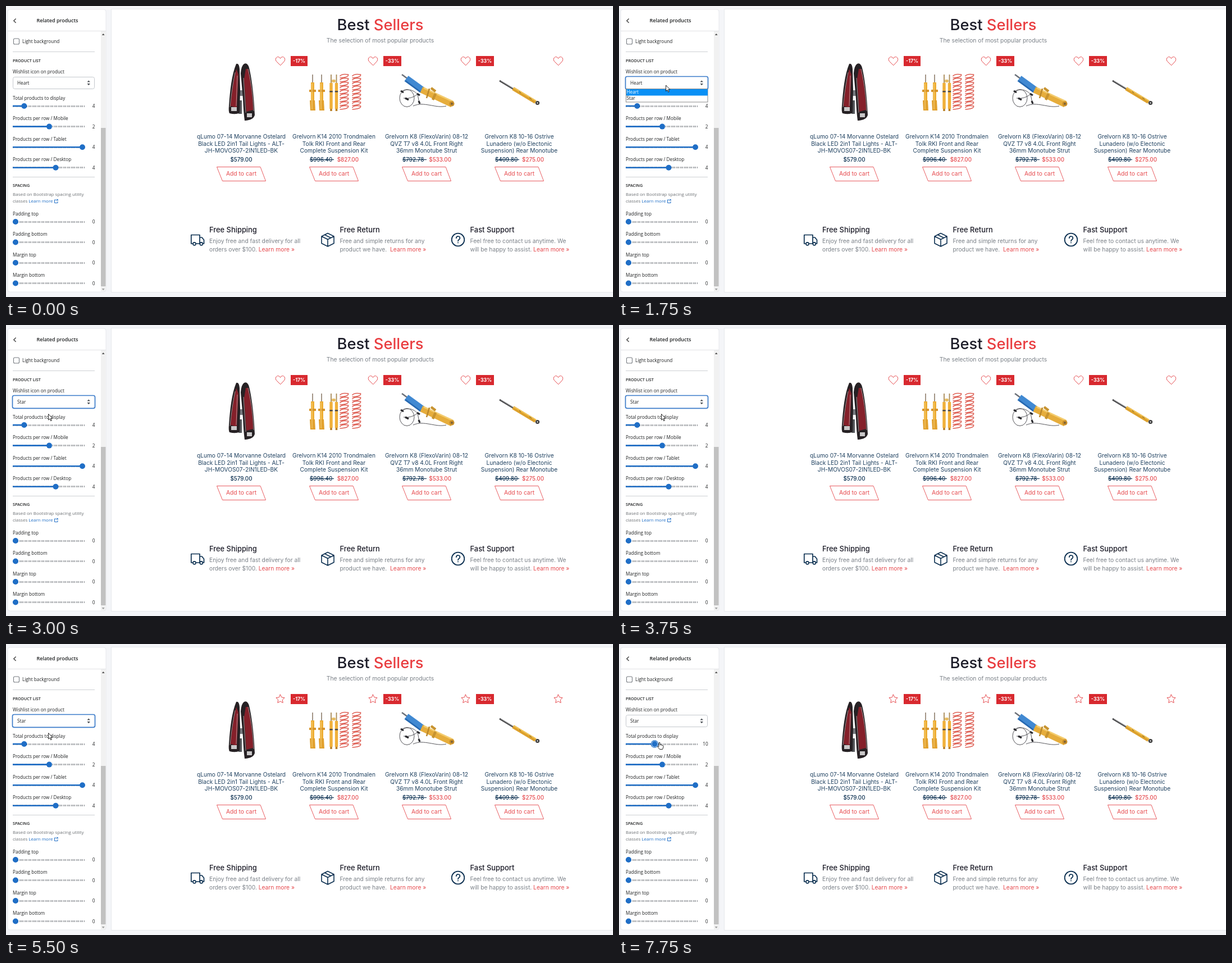
An HTML page for the animation above (8000 ms loop, 1081 by 518 pixels).

```html
<!DOCTYPE html>
<html lang="en">
<head>
<meta charset="utf-8">
<title>Related products editor</title>
<style>
html, body { margin: 0; width: 100%; height: 100%; overflow: hidden; background: #f4f5f8; }
svg { display: block; width: 100vw; height: 100vh; }
text { white-space: pre; font-optical-sizing: none; }
.ui { font-family: "Open Sans", "Noto Sans", sans-serif; }
.shop { font-family: Inter, "Open Sans", sans-serif; }
</style>
</head>
<body>
<svg id="stage" viewBox="0 0 1081 518"></svg>
<script>
const LOOP = 8000, SCROLL = 334;
const INK = '#202223', BLUE = '#1f6ec6', NAVY = '#0b2f50', TITLE = '#1f4160', RED = '#e64a4e', GREY = '#7b8188';

const text = (x, y, size, content, fill, extra = '') =>
  `<text x="${x}" y="${y}" font-size="${size}" fill="${fill}" ${extra}>${content}</text>`;
const mid = (x, y, size, content, fill, extra = '') =>
  text(x, y, size, content, fill, 'text-anchor="middle" ' + extra);
const rect = (x, y, w, h, fill, extra = '') =>
  `<rect x="${x}" y="${y}" width="${w}" height="${h}" fill="${fill}" ${extra}/>`;
const circle = (x, y, r, fill, extra = '') =>
  `<circle cx="${x}" cy="${y}" r="${r}" fill="${fill}" ${extra}/>`;
const line = (d, stroke, width = 1, extra = '') =>
  `<path d="${d}" fill="none" stroke="${stroke}" stroke-width="${width}" ${extra}/>`;
const shape = (d, fill, extra = '') => `<path d="${d}" fill="${fill}" ${extra}/>`;
const group = (content, attrs = '') => `<g ${attrs}>${content}</g>`;
const W = n => `font-weight="${n}"`;
const ROUND = 'stroke-linejoin="round" stroke-linecap="round"';

// Settings panel
function slider(label, y, thumb, value, id = '') {
  const tag = part => id ? `id="${id}-${part}"` : '';
  return text(12, y - 11.5, 8.2, label, INK) +
    line(`M12 ${y}H141`, '#85898e', 3, 'stroke-dasharray="1 1.3" shape-rendering="crispEdges"') +
    line(`M12 ${y}H${thumb}`, BLUE, 2.6, tag('fill')) +
    circle(thumb, y, 6.2, '#fff', `stroke="${BLUE}" stroke-width="1.2" ${tag('ring')} visibility="hidden"`) +
    circle(thumb, y, 5, BLUE, tag('thumb')) +
    mid(id ? 154.5 : 156, y + 3, 8.2, value, INK, tag('value'));
}

function panel() {
  const rule = y => line(`M12 ${y}H158`, '#cdd0d4');
  return rect(3, 6, 175, 503, '#fff', 'rx="4" stroke="#e6e8ec"') +
    line('M17.6 22.5L13.8 26.2L17.6 29.9', '#444', 1.4) +
    mid(91.5, 29, 9, 'Related products', INK, W(600)) +
    line('M3 44.5H178', '#e1e3e6') +
    rect(169, 45, 8.5, 463, '#f1f1f1') + rect(169, 217, 8.5, 282, '#c1c1c1') +
    shape('M170.8 52L173.2 49L175.6 52Z', '#505050') + shape('M170.8 503L173.2 506L175.6 503Z', '#9a9a9a') +
    rect(13.5, 58, 10, 10, '#fff', 'rx="2" stroke="#767b80" stroke-width="1.1"') +
    text(29, 66, 8.2, 'Light background', INK) + rule(81.5) +
    text(12, 99.5, 7.2, 'PRODUCT LIST', INK, W(600)) +
    text(12, 120, 8.2, 'Wishlist icon on product', INK) +
    rect(12.5, 126.5, 145, 21, '#fff', 'id="select" rx="3"') +
    text(20, 139.7, 8.2, 'Heart', INK, 'id="choice"') +
    shape('M144.5 135.6L147.2 132.4L149.9 135.6ZM144.5 138L147.2 141.2L149.9 138Z', '#4a4f55') +
    slider('Total products to display', 178, 32, '4', 'total') +
    slider('Products per row / Mobile', 214.6, 77, '2') +
    slider('Products per row / Tablet', 251.2, 136, '4') +
    slider('Products per row / Desktop', 287.8, 88.5, '4') +
    rule(304.5) + text(12, 322, 7.2, 'SPACING', INK, W(600)) +
    text(12, 338, 8, 'Based on Bootstrap spacing utility', '#6d7175') +
    text(12, 350, 8, `classes <tspan fill="${BLUE}">Learn more</tspan>`, '#6d7175') +
    line('M89 345H86.5V350.5H92V348M89 347.5L92 344.5M89.8 344.3H92.2V346.7', BLUE, 1) +
    ['Padding top', 'Padding bottom', 'Margin top', 'Margin bottom']
      .map((label, i) => slider(label, 384 + i * 36.5, 17, '0')).join('') +
    group(rect(12.5, 147.5, 145.5, 23.5, '#fff', 'stroke="#8a8a8a"') +
      rect(13, 159, 145, 11.5, '#0a90f5', 'id="highlight"') +
      text(13.5, 156, 8.2, 'Heart', INK, 'id="option0"') +
      text(13.5, 167.2, 8.2, 'Star', INK, 'id="option1"'), 'id="menu"');
}

// Product pictures, simplified to flat shapes
const tailLights = () =>
  rect(413, 150, 9, 10, '#77797e') + rect(414, 168, 6, 24, '#54565a') +
  shape('M410 103Q415 101 416 112L417 150L416 190Q410 194 398 191Q396 187 397 178C399 150 402 122 410 103Z', '#262124') +
  shape('M410 112C405 135 402 155 400 178L411 181L414 122Z', '#85202a') +
  line('M408 118C404 138 401 158 399 180M412 124L410 178', '#c3a9aa', .8) + rect(401, 180, 10, 7, '#c9c7c8') +
  shape('M424 103Q430 100 433 110C438 130 442 165 443 194Q441 203 425 204Q423 190 422 165L418 120Q419 106 424 103Z', '#262124') +
  shape('M427 112L424 130L428 188L440 185C439 160 436 135 431 112Z', '#85202a') +
  line('M431 112C437 138 440 160 441 187M423 128L427 190', '#c3a9aa', .8) + rect(429, 191, 9, 7, '#c9c7c8');

function suspensionKit() {
  const spring = x => {
    let d = '';
    for (let y = 124; y < 186; y += 7)
      d += `M${x - 7.5} ${y + 1}Q${x - 4} ${y - 4} ${x + 7.5} ${y - 2}Q${x + 9} ${y + 3} ${x - 7.5} ${y + 4}`;
    return line(d, '#de6156', 1.6);
  };
  const strut = x => line(`M${x} 122V139`, '#8c7b69', 1.6) + rect(x - 3, 136, 6, 50, '#eeae35') +
    rect(x - 6, 149, 12, 4, '#d8952a') + shape(`M${x - 5} 168H${x + 4}L${x + 5} 186H${x - 4}Z`, '#e2a12e') +
    line(`M${x - 1} 138V184`, '#f6cf78', 1.2);
  const damper = x => line(`M${x} 122V137`, '#a98a55', 1.8) + rect(x - 2.7, 137, 5.4, 46, '#f0b03a') +
    rect(x - 2.7, 151, 5.4, 2.5, '#4c4a48') + rect(x - 1.8, 183, 3.6, 4, '#b98128');
  return strut(546) + strut(562) + damper(579) + damper(588.5) +
    rect(580, 131, 7, 5, '#e8bd62', 'rx="2"') + spring(602) + spring(624);
}

const monotube = () =>
  line('M705 122L716 130', '#6b7078', 2.6) +
  line('M713 129L742 150', '#4189d2', 12) + line('M711 133L738 153', '#2768b0', 2.5) +
  line('M740 149L795 175', '#e6ad3c', 11.5) + line('M744 146L796 170', '#f4cd70', 2.5) +
  line('M754 147L749 164', '#b9862b', 2.5) + line('M757 146L765 152M765 156L760 167', '#c7932f', 4.5) +
  circle(794, 174, 4.5, '#c88e2a') + circle(794, 174, 1.8, '#6d5a3a') +
  `<ellipse cx="714" cy="164" rx="13" ry="15.5" fill="none" stroke="#55555a"/>` +
  line('M706 151Q722 145 733 157Q722 166 708 164M725 178C745 169 765 183 784 178M733 157L736 173', '#55555a', 1) +
  line('M703 151L708 154M711 164L717 167M732 156L737 159M735 169L737 174', '#29292d', 3.2);

const rearShock = () =>
  line('M879 133L904 148', '#4a4a4c', 2.8) + line('M881 133L904 147', '#a4a5a8', 1) +
  line('M903 147L943 171', '#dda12c', 6.5) + line('M904 145.5L944 169', '#f3c657', 1.8) +
  line('M914 152L917 155M932 163L936 166', '#725a2d', 1) +
  circle(946.5, 172.5, 3.6, '#383838') + circle(946.5, 172.5, 1.5, '#bbb');

const products = [
  { art: tailLights, lines: ['qLumo 07-14 Morvanne Ostelard', 'Black LED 2in1 Tail Lights - ALT-', 'JH-MOVOS07-2IN1LED-BK'], price: '$579.00' },
  { art: suspensionKit, lines: ['Grelvorn K14 2010 Trondmalen', 'Tolk RKI Front and Rear', 'Complete Suspension Kit'], price: '$827.00', old: '$996.40', sale: '-17%' },
  { art: monotube, lines: ['Grelvorn K8 (FlexoVarin) 08-12', 'QVZ T7 v8 4.0L Front Right', '36mm Monotube Strut'], price: '$533.00', old: '$792.78', sale: '-33%' },
  { art: rearShock, lines: ['Grelvorn K8 10-16 Ostrive', 'Lunadero (w/o Electonic', 'Suspension) Rear Monotube'], price: '$275.00', old: '$409.80', sale: '-33%' }
];

function starPath(cx, cy, r) {
  const points = Array.from({ length: 10 }, (_, i) => {
    const a = -Math.PI / 2 + i * Math.PI / 5, k = i % 2 ? r * .5 : r;
    return (cx + k * Math.cos(a)).toFixed(1) + ' ' + (cy + k * Math.sin(a)).toFixed(1);
  });
  return 'M' + points.join('L') + 'Z';
}
const heartPath = (x, y) =>
  `M${x} ${y + 8}L${x - 7} ${y + 1}C${x - 10} ${y - 3} ${x - 7} ${y - 7} ${x - 4} ${y - 7}Q${x - 1.5} ${y - 7} ${x} ${y - 4}` +
  `Q${x + 1.5} ${y - 7} ${x + 4} ${y - 7}C${x + 7} ${y - 7} ${x + 10} ${y - 3} ${x + 7} ${y + 1}Z`;

function card({ art, lines, price, old, sale }, i) {
  const c = 419 + i * 165, badge = i === 1 ? 30 : 32;
  return art() +
    (sale ? rect(c - 77, 89, badge, 18, '#d8292f') + mid(c - 77 + badge / 2, 101.3, 8.8, sale, '#fff', W(700)) : '') +
    lines.map((s, n) => mid(c, 236.3 + n * 12.3, 10.2, s, TITLE)).join('') +
    (old ? text(c - 43, 277, 9.8, old, NAVY, W(500)) + line(`M${c - 43} 273.5H${c}`, NAVY, 1) +
      text(c + 44, 277, 9.8, price, RED, W(500) + ' text-anchor="end"')
      : mid(c, 277, 9.8, price, NAVY, W(500))) +
    line(`M${c - 43.5} 286.5H${c + 34}L${c + 43.5} 311.5H${c - 33.5}Z`, RED, .9) +
    mid(c, 302.4, 10.3, 'Add to cart', RED);
}

function feature(x, title, first, second) {
  return text(x, 403.3, 12.9, title, '#1c1c28', W(500)) + text(x, 422, 10.25, first, GREY) +
    text(x, 436.6, 10.25, `${second}<tspan fill="${RED}">Learn more »</tspan>`, GREY);
}

const features = () =>
  line('M332 423H329.8V407.5H345V423H339M345 412H349L352.5 416.5V423H350.5', NAVY, 1.7, ROUND) +
  [335.5, 347.8].map(x => circle(x, 423.4, 2.5, '#fff', `stroke="${NAVY}" stroke-width="1.6"`)).join('') +
  line('M573 404.5L584 410V422.5L573 428L562 422.5V410ZM562 410L573 415.5L584 410M573 415.5V428M567.5 407.2L578.5 412.8', NAVY, 1.6, ROUND) +
  circle(805, 416, 11.3, 'none', `stroke="${NAVY}" stroke-width="1.8"`) +
  line('M801.8 413.2C801.8 408.8 808.4 409 808.4 413.2C808.4 415.8 805 415.6 805 418.4M805 421V421.5', NAVY, 1.7, ROUND) +
  feature(362, 'Free Shipping', 'Enjoy free and fast delivery for all', 'orders over $100. ') +
  feature(594.5, 'Free Return', 'Free and simple returns for any', 'product we have.&#160; ') +
  feature(826.5, 'Fast Support', 'Feel free to contact us anytime. We', 'will be happy to assist. ');

// Page bottom, in coordinates of the scrolled view
function footer() {
  const columns = [
    ['Collections', 'Exterior', 'Interior', 'Performance', 'Wheels &amp; Tires'],
    ['Resources', 'About us', 'Contact us', 'F.A.Q', 'Our Stores'],
    ['Important', 'Terms of Service', 'Privacy Policy', 'Shipping Policy', 'Refund Policy'],
    ['Another Block', 'You can display here', 'any richtext, html', 'code or a menu. Feel', 'free to edit this text.']
  ];
  const small = (x, y, s, weight = 500) => text(x, y, 9.2, s, '#fff', W(weight));
  const underline = (x, y, w) => line(`M${x} ${y}H${x + w}`, '#8497a8', .8);
  return shape('M188 238L929 175L1081 209V510H188Z', '#033456') +
    group(shape('M454 175H809L878 325H524Z', '#014f84', 'style="filter:drop-shadow(0 0 9px rgba(0,0,0,.5))"'), 'clip-path="url(#band)"') +
    mid(645, 210, 22.4, `Newsletter <tspan fill="#f8414a">Subscribe</tspan>`, '#fff', W(500)) +
    mid(666.5, 230.8, 10.3, 'Be the first to get notified about our latest offers.', '#cbdae6') +
    mid(632, 265, 10.3, 'Your email', '#8eafc9') + line('M573 272.5H691', '#c5d5e2') +
    shape('M696 250H766L776 273H706Z', '#fc3c43') + mid(735.7, 264.8, 10.2, 'Subscribe', '#fff', W(500)) +
    mid(667, 297, 9.1, 'Note: We usually send once a week', '#fff', W(500) + ' font-style="italic"') +
    rect(328, 363, 214, 138, '#02233f') +
    rect(338, 377, 18, 18, '#fff') + text(362, 390.5, 13, 'BRILVONDA', '#fff', W(600)) +
    small(337, 415, 'Increase customer loyalty and boost sales') +
    small(337, 428, 'with a smarter site search. Learn more') +
    small(337, 440.5, 'about us', 700) + underline(337, 444.5, 41) +
    text(356, 466, 9.5, 'hello@shop.example', '#fff', W(700)) + underline(356, 470.5, 103) +
    text(356, 485, 9.2, '800-555-0142', '#fff', W(700)) + underline(356, 489.5, 63) +
    circle(343, 463, 1.9, 'none', 'stroke="#d5dde4" stroke-width=".9"') +
    line('M345 461V464C345 465.8 348 465.8 348 463A5 5 0 1 0 345.5 467.3', '#d5dde4', .9) +
    line('M340 477.5L342 477.5L343 480L341.7 481Q342.5 483 344.5 484L345.5 482.6L348 483.6V485.6Q347 487 345 486.5Q339.5 484.5 338.5 479Q338.5 478 340 477.5Z', '#d5dde4', .9) +
    columns.map(([title, ...rows], i) => {
      const x = 560 + i * 116, step = i === 3 ? 12.8 : 17.7, top = i === 3 ? 410.3 : 412.5;
      return text(x, 393, 12.8, title, '#fff', W(500)) + rows.map((s, n) => small(x, top + n * step, s)).join('');
    }).join('') +
    small(908, 471, 'Learn more', 700) + underline(908, 475, 52);
}

const wishes = path => products.map((_, i) => line(path(488.5 + i * 165, 97.5), RED, 1, ROUND)).join('');

document.getElementById('stage').innerHTML =
  `<defs><clipPath id="view"><rect x="188" y="6" width="893" height="503"/></clipPath>
   <clipPath id="band"><rect x="400" y="175" width="540" height="150"/></clipPath></defs>` +
  group(panel(), 'class="ui"') +
  rect(187.5, 5.5, 900, 504, '#fff', 'stroke="#e6e8ec"') +
  group(group(
    mid(666.5, 43, 27.3, `Best <tspan fill="#e93d40">Sellers</tspan>`, '#1d1d29', W(500)) +
    mid(666.5, 65.3, 10.3, 'The selection of most popular products', GREY) +
    products.map(card).join('') +
    group(wishes(heartPath), 'id="hearts"') + group(wishes((x, y) => starPath(x, y + .6, 8)), 'id="stars"') +
    features() + group(footer(), `transform="translate(0 ${SCROLL})"`), 'id="page"'), 'class="shop" clip-path="url(#view)"') +
  shape('M0 0V10.6L2.5 8.3L4.1 12.2L5.8 11.5L4.2 7.7H7.4Z', '#fff', 'id="arrow" stroke="#111" stroke-width=".9"') +
  shape('M2.5 8V1.2Q3.5 -.2 4.5 1.2V5Q5.7 4.2 6.5 5.4Q7.8 4.7 8.5 5.9Q10.3 5.5 10.4 7.2V9.5L9 13H4L.3 8.5Q.2 6.7 2.5 8Z', '#fff', 'id="hand" stroke="#111" stroke-width=".9"');

// Pointer stops: [time, x, y]
const pointer = [
  [250, 217, 298], [500, 104, 157.5], [1250, 90.5, 144], [1500, 83.5, 141], [2000, 76, 153],
  [2250, 79.5, 160], [3000, 75.5, 158.5], [6500, 72, 158], [6750, 50, 168],
  [7000, 37, 176], [7250, 48, 174.5], [7500, 63, 174.5], [7750, 68.5, 174.5]
];
const totals = [[0, 4], [7250, 6], [7500, 9], [7750, 10]];

const lastStop = (stops, t) => stops.filter(s => s[0] <= t).pop();
const el = id => document.getElementById(id);
const show = (id, on) => el(id).setAttribute('visibility', on ? 'visible' : 'hidden');
const set = (id, attrs) => { for (const k in attrs) el(id).setAttribute(k, attrs[k]); };

function render(t) {
  const between = (a, b) => t >= a && t < b;

  const focused = between(1750, 7250);
  set('select', focused
    ? { x: 11.5, y: 125.5, width: 147, height: 22.8, stroke: '#3b7bc9', 'stroke-width': 1.7 }
    : { x: 12.5, y: 126.5, width: 145, height: 21, stroke: '#c4c8cd', 'stroke-width': 1 });
  el('choice').textContent = t < 2750 ? 'Heart' : 'Star';

  const onStar = t >= 2250;
  show('menu', between(1750, 2750));
  set('highlight', { y: onStar ? 159 : 148 });
  set('option0', { fill: onStar ? INK : '#fff' });
  set('option1', { fill: onStar ? '#fff' : INK });

  const total = lastStop(totals, t)[1], x = 11.6 + total * 5.18;
  set('total-fill', { d: `M12 178H${x}` });
  set('total-thumb', { cx: x });
  set('total-ring', { cx: x });
  show('total-ring', t >= 7250);
  el('total-value').textContent = total;
  set('total-value', { x: total > 9 ? 154 : 156 });

  set('page', { transform: `translate(0 ${between(5000, 5500) ? -SCROLL : 0})` });
  show('hearts', t < 5000);
  show('stars', t >= 5000);

  const stop = lastStop(pointer, t), overThumb = t >= 7000;
  show('arrow', stop && !overThumb);
  show('hand', overThumb);
  if (stop) set(overThumb ? 'hand' : 'arrow', { transform: `translate(${stop[1]} ${stop[2]})` });
}

const start = performance.now();
function tick() {
  render((performance.now() - start) % LOOP);
  requestAnimationFrame(tick);
}
tick();
</script>
</body>
</html>
```
